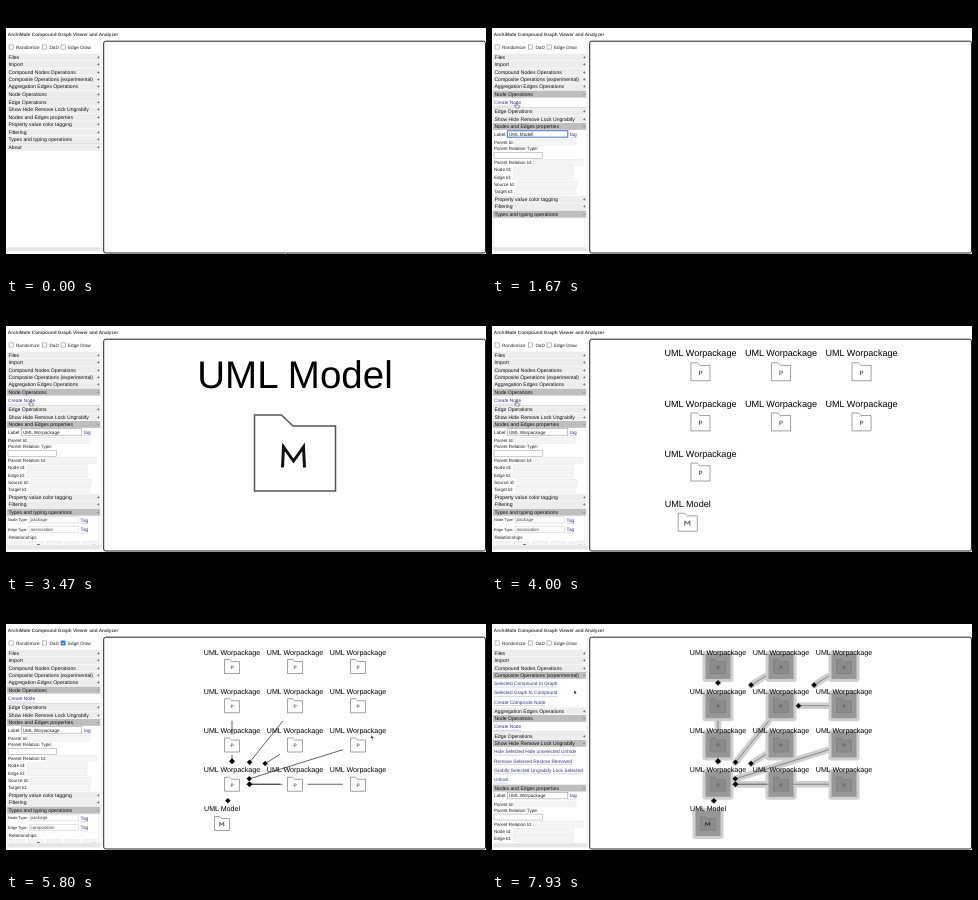
Recreate the animation shown at these times as an HTML page with a canvas. Size 480x270 px, loop 8000 ms.

```html
<!DOCTYPE html>
<html lang="en">
<head>
<meta charset="utf-8">
<title>Compound graph viewer</title>
<style>
  html, body { margin: 0; width: 100%; height: 100%; overflow: hidden; background: #fff; }
  canvas { display: block; width: 480px; height: 270px; }
</style>
</head>
<body>
<canvas id="stage"></canvas>
<script>
const LOOP = 8000, STEP = 1000 / 15;
const FONT = '"Liberation Sans", Arial, sans-serif';
const canvas = document.getElementById('stage');
const ctx = canvas.getContext('2d');
const dpr = window.devicePixelRatio || 1;
canvas.width = 480 * dpr;
canvas.height = 270 * dpr;

// ---- helpers ----
function track(points, t) {
  const i = points.findIndex(p => p[0] > t);
  if (i === 0) return points[0].slice(1);
  if (i < 0) return points[points.length - 1].slice(1);
  const a = points[i - 1], b = points[i], k = (t - a[0]) / (b[0] - a[0]);
  return a.slice(1).map((v, j) => v + (b[j + 1] - v) * k);
}
const ramp = (t, from, to) => Math.min(1, Math.max(0, (t - from) / (to - from)));
const typed = (word, t, from, to) => word.slice(0, Math.round(word.length * ramp(t, from, to)));

function rect(x, y, w, h, fill, stroke, width = 0.5) {
  if (fill) { ctx.fillStyle = fill; ctx.fillRect(x, y, w, h); }
  if (stroke) { ctx.strokeStyle = stroke; ctx.lineWidth = width; ctx.strokeRect(x, y, w, h); }
}
function line(points, color, width, fill, close) {
  ctx.beginPath();
  points.forEach(([x, y]) => ctx.lineTo(x, y));
  if (close) ctx.closePath();
  if (fill) { ctx.fillStyle = fill; ctx.fill(); }
  if (color) { ctx.strokeStyle = color; ctx.lineWidth = width; ctx.stroke(); }
}
function text(str, x, y, size, color = '#222', align = 'left', weight = '') {
  ctx.font = `${weight} ${size}px ${FONT}`;
  ctx.textAlign = align;
  ctx.fillStyle = color;
  ctx.fillText(str, x, y + size * 0.35);
  return ctx.measureText(str).width;
}

// ---- graph ----
const LABEL_WIDTH = 308, COL = 341.5, ROW = 212.7, SMALL = 0.1845;
const FIRST_PACKAGE = 3600, PACKAGE_GAP = 60;
const MODEL_AT = 2530, SELECTED_AT = 7700;
// source column and row, target column and row, time
const EDGES = [
  [0, 3, 0, 4, 5000], [0, 2, 0, 3, 5180], [1, 3, 0, 3, 5330], [2, 3, 0, 3, 5400],
  [1, 2, 0, 3, 5470], [0, 1, 0, 3, 5540], [1, 1, 0, 3, 5610], [2, 2, 0, 3, 5730],
  [2, 1, 1, 1, 5930], [2, 0, 1, 1, 6070], [1, 0, 0, 1, 6200], [0, 0, 0, 1, 6330]
];
const LOOP_EDGE = { drawn: 6470, selected: 6670, removed: 7330 };

const spot = (col, row) => row === 4 ? [216, 221.5] : [226 + 63 * col, 64.5 + 39.25 * row];

function nodeAt(x, y, z, isModel, selected) {
  const px = (dx, dy) => [x + dx * z, y + dy * z];
  if (selected) rect(x - 12.5, y - 12.5, 25, 25, '#979797');
  else rect(x - 68 * z, y - 55 * z, 136 * z, 110 * z, '#fff');
  const ink = selected ? '#777' : '#555';
  line([px(-40.5, -38), px(-13.5, -38), px(-2, -27), px(40.5, -27), px(40.5, 38), px(-40.5, 38)],
    ink, Math.max(0.55, 1.5 * z), selected ? '#8b8b8b' : '#fff', true);
  if (isModel) {
    line([px(-12.5, 14.5), px(-11.5, -6), px(-1.5, 8), px(8.5, -6), px(9.5, 14.5)],
      '#111', Math.max(0.7, 3 * z));
  } else {
    text('P', x, y + 4 * z, 26 * z, selected ? '#444' : '#222', 'center');
  }
  text(isModel ? 'UML Model' : 'UML Worpackage', x, y - 78.5 * z, 38.5 * z, '#000', 'center');
}

function edgeEnds([sc, sr, tc, tr]) {
  const [sx, sy] = spot(sc, sr), [tx, ty] = spot(tc, tr);
  const dx = sx - tx, dy = sy - ty, len = Math.hypot(dx, dy);
  const start = 15 / Math.max(Math.abs(dx), Math.abs(dy));
  const hitsLabel = Math.abs(dy) > 0.5 * Math.abs(dx);
  const end = (hitsLabel ? 18 / Math.abs(dy) : 12.5 / Math.abs(dx)) + 5 / len;
  return [[sx - dx * start, sy - dy * start], [tx + dx * end, ty + dy * end]];
}
function diamond([x, y]) {
  line([[x, y - 2.5], [x + 2.5, y], [x, y + 2.5], [x - 2.5, y]], '#000', 0.4, '#000', true);
}
function selfLoop(t) {
  if (t < LOOP_EDGE.drawn || t >= LOOP_EDGE.removed) return;
  const stroke = (color, width) => {
    ctx.beginPath();
    ctx.moveTo(273, 103);
    ctx.bezierCurveTo(262, 97, 286, 74, 289, 88);
    ctx.strokeStyle = color;
    ctx.lineWidth = width;
    ctx.stroke();
  };
  ctx.lineCap = 'round';
  if (t >= LOOP_EDGE.selected) stroke('#bdbdbd', 6.5);
  stroke('#555', 0.7);
  ctx.lineCap = 'butt';
}

function drawGraph(t) {
  ctx.beginPath();
  ctx.roundRect(97.7, 35.2, 381.8, 211.8, 2);
  ctx.fillStyle = '#fff';
  ctx.fill();
  ctx.strokeStyle = '#222';
  ctx.lineWidth = 1;
  ctx.stroke();
  if (t < MODEL_AT) return;

  const count = Math.min(12, Math.max(0, Math.floor((t - FIRST_PACKAGE) / PACKAGE_GAP) + 1));
  if (!count) { nodeAt(289, 149, 1, true); return; }
  const cols = Math.min(3, count), rows = Math.ceil(count / 3) + 1;
  const z = count === 12 ? SMALL
    : Math.min(183 / (ROW * (rows - 1) + 138), 306 / (COL * (cols - 1) + LABEL_WIDTH));
  const left = 289 - COL * z * (cols - 1) / 2, top = 143 - ROW * z * (rows - 1) / 2;
  const selected = t >= SELECTED_AT;
  const edges = EDGES.filter(e => t >= e[4]).map(edgeEnds);
  const nodes = Array.from({ length: count }, (_, i) =>
    [left + (i % 3) * COL * z, top + Math.floor(i / 3) * ROW * z, false]);
  nodes.push([left - 54 * z, top + (rows - 1) * ROW * z, true]);

  if (selected) {
    ctx.lineCap = 'round';
    edges.forEach(e => line(e, '#cfcfcf', 6.5));
    ctx.lineCap = 'butt';
    ctx.fillStyle = '#cfcfcf';
    nodes.forEach(([x, y]) => {
      ctx.beginPath();
      ctx.roundRect(x - 15.5, y - 15.5, 31, 31, 3);
      ctx.fill();
    });
  }
  edges.forEach(e => line(e, selected ? '#666' : '#222', 0.7));
  nodes.forEach(([x, y, isModel]) => nodeAt(x, y, z, isModel, selected));
  edges.forEach(e => diamond(e[1]));
  selfLoop(t);

  if (t >= 7530 && t < SELECTED_AT) {
    const [x, y] = cursorAt(t);
    rect(185, 40, x - 185, y - 40, 'rgba(200,200,200,.35)', '#aaa');
  }
}

// ---- side panel ----
const LINK = '#35358c';
function links(words, x, y) {
  words.forEach(word => {
    const w = text(word, x, y, 4.8, LINK);
    line([[x, y + 3.6], [x + w, y + 3.6]], '#9a9ac0', 0.4);
    x += w + 1.4;
  });
}
function checkbox(x, label, on, y) {
  rect(x, y - 2.1, 4.2, 4.2, on ? '#2f6fe0' : '#fff', on ? '#2f6fe0' : '#777');
  if (on) line([[x + 0.8, y], [x + 1.8, y + 1.2], [x + 3.5, y - 1.3]], '#fff', 0.7);
  text(label, x + 7, y, 4.65);
}
function field(label, x, w, y) {
  text(label, 2, y, 4.6);
  rect(x, y - 3, w, 6, '#f5f5f5', '#e2e2e2', 0.4);
}
function properties(y, t) {
  const second = t >= 2670;
  const value = second ? typed('UML Worpackage', t, 2730, 3000) : typed('UML Model', t, 1130, 1400);
  const focus = (t >= 1070 && t < 2470) || (second && t < 3130);
  text('Label:', 2, y + 7.6, 4.6);
  rect(15.3, y + 4.4, 60.5, 6.4, '#fff', focus ? '#2f62c8' : '#888', focus ? 0.9 : 0.5);
  const w = text(value, 17, y + 7.6, 4.6);
  if (focus) line([[17.4 + w, y + 5.2], [17.4 + w, y + 10]], '#222', 0.4);
  links(['tag'], 78, y + 7.6);
  field('Parent Id:', 23, 61, y + 16);
  text('Parent Relation Type:', 2, y + 22.5, 4.6);
  rect(2, y + 26, 48.5, 6, '#fff', '#999');
  [['Parent Relation Id:', 41, 50], ['Node Id:', 21.5, 60], ['Edge Id:', 21, 60],
   ['Source Id:', 25, 60], ['Target Id:', 24, 60]]
    .forEach(([label, x, width], i) => field(label, x, width, y + 36 + i * 7.28));
}

const PALETTE = [
  ['Relationships', '#222', 'dash square line dash ball'],
  ['Motivation', '#b9b9f5', 'lens slant wheel cross oval'],
  ['Strategy', '#f3d98a', 'card grid lens notch'],
  ['Business', '#f8f29a', 'notch oval chevron pair pin'],
  ['Application', '#aeeef0', 'notch oval chevron pair pin'],
  ['Information & Communication Technology', '#bfeab5', 'notch oval chevron pair pin'],
  ['Physical', '#c3e9bd', 'gear factory gear arrows'],
  ['Implementation - Migration', '#f3aee6', 'notch card flag wheel bars']
];
function ellipse(x, y, rx, ry, fill) {
  ctx.beginPath();
  ctx.ellipse(x, y, rx, ry, 0, 0, 7);
  ctx.fillStyle = fill;
  ctx.fill();
  ctx.strokeStyle = '#222';
  ctx.lineWidth = 0.8;
  ctx.stroke();
}
function icon(kind, x, y, fill) {
  const poly = (...p) => line(p.map(([a, b]) => [x + a, y + b]), '#222', 0.8, fill, true);
  const stroke = (...p) => line(p.map(([a, b]) => [x + a, y + b]), '#222', 0.7);
  const box = (a, b, w, h) => rect(x + a, y + b, w, h, fill, '#222', 0.8);
  const shapes = {
    dash() { line([[x - 3, y + 3], [x + 3, y - 3]], '#bbb', 0.7); },
    line() { stroke([-3, 3], [3, -3]); stroke([0.5, -3], [3, -3], [3, -0.5]); },
    square() { stroke([-3, 3], [3, -3]); rect(x - 4, y + 1.5, 2.5, 2.5, '#fff', '#222'); box(2, -4, 2, 2); },
    ball() { stroke([-3, 3], [3, -3]); ellipse(x - 3, y + 3, 1, 1, fill); ellipse(x + 3, y - 3, 0.8, 0.8, fill); },
    lens() { stroke([-5, 5], [0, 0]); ellipse(x + 1.2, y - 1.2, 3.8, 3.8, fill); },
    slant() { poly([-3, -3.5], [6, -3.5], [3, 3.5], [-6, 3.5]); stroke([-1, 3.5], [2, -3.5]); },
    wheel() { ellipse(x, y, 5.3, 5.3, fill); stroke([-5, 0], [5, 0]); stroke([0, -5], [0, 5]); },
    cross() { ellipse(x, y, 5.3, 5.3, fill); ellipse(x, y, 2, 2, '#222'); },
    oval() { ellipse(x, y, 5.8, 4, fill); stroke([-1.5, -2], [-1.5, 2]); stroke([1.5, -2], [1.5, 2]); },
    card() { box(-5.5, -4, 11, 8); stroke([-3, -1], [3, -1]); },
    grid() { for (let i = 0; i < 9; i++) if (i) box(-5.5 + (i % 3) * 3.7, -5.5 + Math.floor(i / 3) * 3.7, 3.7, 3.7); },
    notch() { poly([-5.5, -4], [2, -4], [5, -2], [5, 2], [2, 4], [-5.5, 4], [-3, 0]); },
    chevron() { poly([0, -5], [5, 0], [5, 5], [0, 1], [-5, 5], [-5, 0]); },
    pair() { ellipse(x - 3, y, 2.4, 5, fill); ellipse(x + 3, y, 2.4, 5, fill); },
    pin() { stroke([-6, 0], [0, 0]); ellipse(x + 3, y, 4, 4, fill); },
    gear() { poly([-5, -3], [0, -5.5], [5, -3], [5, 3], [0, 5.5], [-5, 3]); ellipse(x, y, 2, 2, '#fff'); },
    factory() { poly([-5, 5], [-5, -5], [-3, -5], [-2, 1], [1, -2], [1, 1], [5, -2], [5, 5]); },
    arrows() { poly([-6, 0], [-3, -3], [-3, -1], [3, -1], [3, -3], [6, 0], [3, 3], [3, 1], [-3, 1], [-3, 3]); },
    flag() { poly([-5.5, -4], [5.5, -4], [5.5, 3], [0, 3], [-3, 4.5], [-5.5, 3]); },
    bars() { [-3.5, 0, 3.5].forEach(b => line([[x - 5, y + b + 1], [x + 5, y + b - 1]], '#222', 1.6)); }
  };
  shapes[kind]();
}
function types(y, t) {
  rect(1.3, y + 3.8, 91.5, 230, '#fff', '#ddd');
  ctx.globalAlpha = ramp(t, 1790, 1900);
  const nodeType = t < 2200 ? '' : t < 3270 ? 'model' : 'package';
  const edgeType = t < 4600 ? 'association' : 'composition';
  [['Node Type:', nodeType, 7.8], ['Edge Type:', edgeType, 17.2]].forEach(([label, value, dy]) => {
    text(label, 2, y + dy, 3.9);
    rect(23.5, y + dy - 3, 49, 6, '#fff', '#ccc');
    text(value, 24.5, y + dy, 4.5, '#444');
    links(['Tag'], 74.5, y + dy);
  });
  PALETTE.forEach(([title, fill, kinds], i) => {
    const top = y + 25.2 + i * 23.55;
    text(title, 2.5, top, 4.7);
    kinds.split(' ').forEach((kind, k) => {
      const x = 11 + 18.5 * k;
      rect(x - 7.5, top + 4, 15, 15, '#f4f4f4', '#e4e4e4', 0.4);
      icon(kind, x, top + 11.5, fill);
    });
  });
  ctx.globalAlpha = 1;
}

const linkRows = (first, gap, ...rows) => y =>
  rows.forEach((row, i) => links(row.split('|'), 2, y + first + i * gap));
// title, content height, opening times, content, space below
const SECTIONS = [
  ['Files'], ['Import'], ['Compound Nodes Operations'],
  ['Composite Operations (experimental)', 28.3, [7800, 7930], linkRows(8.2, 9.3,
    'Selected Compound to Graph', 'Selected Graph to Compound', 'Create Composite Node')],
  ['Aggregation Edges Operations'],
  ['Node Operations', 9.3, [600, 800], linkRows(8.4, 9, 'Create Node'), 0.7],
  ['Edge Operations'],
  ['Show Hide Remove Lock Ungrabify', 37.4, [7080, 7280], linkRows(8.3, 9.3,
    'Hide Selected|Hide unselected|Unhide', 'Remove Selected|Restore Removed',
    'Grabify Selected|Ungrabify|Lock Selected', 'Unlock')],
  ['Nodes and Edges properties', 65.5, [930, 1070], properties],
  ['Property value color tagging'], ['Filtering'],
  ['Types and typing operations', 225, [1470, 1600], types, 0.7],
  ['About']
];
const SCROLL = [
  [1870, 0], [2070, 175.5], [2250, 175.5], [2400, 0], [3070, 0], [3200, 175.5],
  [3270, 175.5], [3400, 0], [4335, 0], [4460, 175.5], [4610, 175.5], [4740, 0]
];

function drawPanel(t) {
  ctx.save();
  ctx.beginPath();
  ctx.rect(0, 36, 95, 205);
  ctx.clip();
  ctx.translate(0, -track(SCROLL, t)[0]);
  checkbox(3, 'Randomize', false, 41);
  checkbox(36.5, 'DaD', false, 41);
  checkbox(55, 'Edge Draw', t >= 4850 && t < 7450, 41);
  let y = 51;
  for (const [title, height = 0, times, content, space = 0] of SECTIONS) {
    const open = times ? ramp(t, ...times) : 0;
    if (open > 0) {
      ctx.save();
      ctx.beginPath();
      ctx.rect(0, y + 3.4, 95, height * open + 0.6);
      ctx.clip();
      content(y, t);
      ctx.restore();
    }
    rect(0.8, y - 3.4, 93.4, 6.9, open > 0 ? '#bebebe' : '#ededed');
    text(title, 2.4, y, 5.1, '#111');
    text(open > 0 ? '-' : '+', 92.2, y, 5, '#111', 'center');
    y += 7.42 + height * open + space;
    if (space) line([[0.8, y - 4], [94, y - 4]], '#bbb', 0.5);
  }
  ctx.restore();
  rect(1, 241.2, 93.5, 4.2, '#e6e6e6');
  line([[95.3, 36], [95.3, 246]], '#ddd', 0.6);
}

// ---- pointer ----
const POINTER = [
  [0, 281, 246], [70, 281, 246], [600, 45, 89], [870, 45, 89], [950, 45, 120], [1070, 50, 128],
  [1400, 50, 128], [1470, 50, 208], [1650, 24, 97], [1800, 24, 97], [1900, 50, 190],
  [2200, 48, 140], [2470, 24, 97], [2600, 24, 97], [2700, 50, 128], [3000, 50, 128],
  [3130, 45, 190], [3270, 48, 180], [3450, 24, 97], [4330, 24, 97], [4450, 60, 150],
  [4600, 30, 69], [4720, 57, 60], [4850, 57, 41], [5800, 365, 133], [6470, 280, 95],
  [6670, 278, 88], [6930, 21, 113], [7150, 21, 113], [7300, 20, 122], [7450, 57, 41],
  [7520, 185, 40], [7690, 402, 240], [7865, 142, 105], [7930, 82, 88],
  ...EDGES.flatMap(([sc, sr, tc, tr, t]) => [[t - 65, ...spot(sc, sr)], [t, ...spot(tc, tr)]])
].sort((a, b) => a[0] - b[0]);
const cursorAt = t => track(POINTER, t);

function drawPointer(t) {
  const [x, y] = cursorAt(t);
  const hand = x < 46;
  const shape = hand
    ? [[0, 0], [1, 0], [1.2, 2], [3.2, 2.5], [3, 5], [0.2, 5], [-1.4, 2.8], [0, 3]]
    : [[0, 0], [0, 4], [1, 3.2], [1.7, 4.7], [2.3, 4.4], [1.7, 2.9], [2.9, 2.8]];
  line(shape.map(([a, b]) => [x + a, y + b]), hand ? '#222' : '#fff', 0.5, hand ? '#fff' : '#000', true);
}

function draw(t) {
  ctx.setTransform(dpr, 0, 0, dpr, 0, 0);
  ctx.textRendering = 'geometricPrecision';
  rect(0, 0, 480, 270, '#fff');
  text('ArchiMate Compound Graph Viewer and Analyzer', 1.8, 28.3, 4.7, '#444', 'left', 'bold');
  drawPanel(t);
  drawGraph(t);
  drawPointer(t);
  rect(0, 0, 480, 22, '#000');
  rect(0, 248, 480, 22, '#000');
}

const begin = performance.now();
function tick() {
  const ms = (performance.now() - begin) % LOOP;
  draw(Math.floor((ms + 5) / STEP) * STEP);
  requestAnimationFrame(tick);
}
tick();
</script>
</body>
</html>
```
